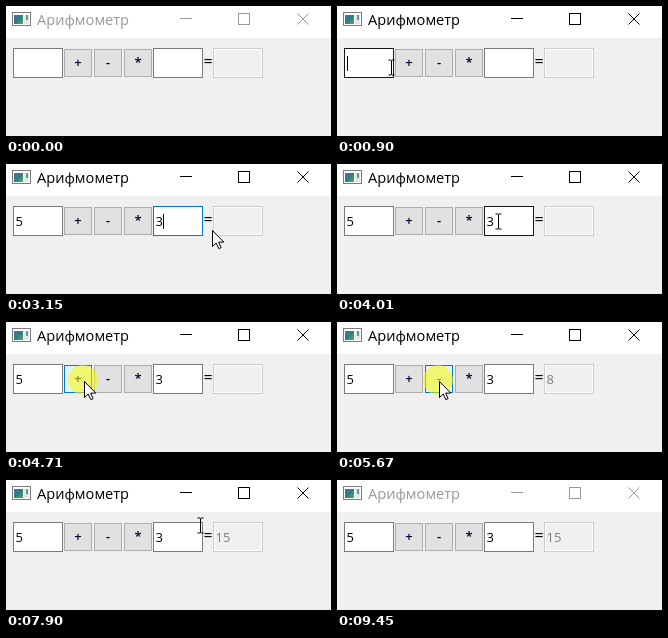
Write an HTML page that moves like this. It is 325 px wide and 130 px high and loops after 9520 ms.

```html
<!DOCTYPE html>
<html lang="ru">
<head>
<meta charset="utf-8">
<title>Арифмометр</title>
<style>
  html, body { margin: 0; width: 100%; height: 100%; overflow: hidden; background: #f0f0f0; }
  svg { display: block; width: 325px; height: 130px; }
  text { font: 13px "Open Sans", "Noto Sans", sans-serif; }
  .title { font-size: 14.6px; }
  .mid { text-anchor: middle; }
  .sign { fill: #000030; font-weight: 600; }
  .box { stroke: #7a7a7a; fill: #fff; }
  .box.focus { stroke: #0078d7; }
  .box.hover { stroke: #171717; }
  .btn { stroke: #adadad; fill: #e1e1e1; }
  .btn.hover { stroke: #0078d7; fill: #e5f1fb; }
</style>
</head>
<body>
<svg viewBox="0 0 325 130">
  <defs>
    <linearGradient id="pane" x2="1" y2="1">
      <stop offset="0" stop-color="#4a6fa0"/>
      <stop offset=".5" stop-color="#2f7f80"/>
      <stop offset="1" stop-color="#58a868"/>
    </linearGradient>
  </defs>
  <rect width="325" height="130" fill="#f0f0f0"/>
  <rect width="325" height="32" fill="#fff"/>
  <g shape-rendering="crispEdges">
    <rect x="6.5" y="6.5" width="18" height="13" fill="#fff" stroke="#7c7c7c"/>
    <rect x="8" y="9" width="9" height="9" fill="url(#pane)"/>
    <rect x="18" y="9" width="5" height="9" fill="#e4e7ea"/>
    <rect x="20" y="9" width="2" height="5" fill="#5f9a96"/>
  </g>
  <text id="title" class="title" x="31" y="19">Арифмометр</text>
  <g id="ctl" fill="none">
    <path d="M174 12.5h12M232.5 7.5h11v11h-11z" shape-rendering="crispEdges"/>
    <path d="M291.5 7.5l11 11m0-11l-11 11"/>
  </g>
  <g id="form"></g>
  <text class="mid" x="202" y="61" style="font-size:16px">=</text>
  <rect x="207.5" y="42.5" width="49" height="29" fill="#f0f0f0" stroke="#ccc"/>
  <rect x="208.5" y="43.5" width="47" height="27" fill="none" stroke="#fff"/>
  <text id="result" x="209.5" y="62" fill="#767d83"></text>
  <rect id="caret" y="50" width="1" height="15"/>
  <circle id="ring" r="15" fill="#fafa00" fill-opacity=".55"/>
  <path id="arrow" d="M1.5 1.5v16l3.7-3.5 2.6 5.6 2.3-1-2.5-5.5h5.2z" fill="#fff" stroke="#000"/>
  <path id="beam" d="M-2.5-7h2.5l.5.5.5-.5h2.5M.5-6.5v14M-2.5 8h2.5l.5-.5.5.5h2.5" fill="none" stroke="#000"/>
</svg>
<script>
const LOOP = 9520, ENTER = 130, LEAVE = 8440;
const HOVER_LAG = 100, RING_TIME = 150, BLINK = 530;
const $ = id => document.getElementById(id);

function add(tag, attrs, text = "") {
  const el = document.createElementNS("http://www.w3.org/2000/svg", tag);
  for (const k in attrs) el.setAttribute(k, attrs[k]);
  el.textContent = text;
  return $("form").appendChild(el);
}
function widget(type, x, y, w, h) {
  const rect = add("rect", { x: x + .5, y: y + .5, width: w - 1, height: h - 1 });
  const hit = p => p[0] >= x && p[0] < x + w && p[1] >= y && p[1] < y + h;
  return { type, x, rect, hit };
}
function box(x) {
  const w = widget("box", x, 42, 50, 30);
  w.label = add("text", { x: x + 2.5, y: 62 });
  return w;
}
function button(x, sign) {
  const w = widget("btn", x, 43, 28, 28);
  add("text", { x: x + 14, y: 61, class: "mid sign" }, sign);
  return w;
}
const boxes = [box(7), box(147)];
const buttons = ["+", "-", "*"].map((sign, i) => button(58 + 30 * i, sign));
const widgets = [...boxes, ...buttons];

// Pointer moves: start time, end time, goal x, y
const moves = [
  [130, 360, 38, 62], [700, 1750, 120, 55], [1750, 2060, 171, 56], [2290, 2600, 203, 65],
  [2900, 3150, 205, 65], [3300, 3460, 226, 57], [3780, 4310, 77, 58], [4880, 5260, 101, 58],
  [5880, 6270, 133, 58], [6900, 6980, 183, 65], [6980, 7130, 261, 66],
  [7280, 7900, 194, 45], [8130, LEAVE, 216, 77]
];
const clicks = [430, 2130, 3610, 4630, 5670, 6670];

// Form changes, each added to the state before it
const changes = [
  [0, { active: false, focus: -1, values: ["", ""], result: "" }],
  [430, { active: true }],
  [500, { focus: 0 }],
  [1370, { values: ["5", ""] }],
  [2200, { focus: 1 }],
  [3150, { values: ["5", "3"] }],
  [4480, { focus: -1 }],
  [4860, { result: "8" }],
  [5810, { result: "2" }],
  [6740, { result: "15" }],
  [9450, { active: false }]
];

function pointer(t) {
  let p = [62, 108];
  for (const [a, b, ...goal] of moves) {
    const k = Math.min(1, Math.max(0, (t - a) / (b - a)));
    p = p.map((v, i) => v + (goal[i] - v) * k);
  }
  return p.map(Math.round);
}

function place(id, shown, x, y) {
  $(id).setAttribute("visibility", shown ? "visible" : "hidden");
  $(id).setAttribute("transform", `translate(${x} ${y})`);
}

function draw(t) {
  const past = changes.filter(c => c[0] <= t);
  const state = Object.assign({}, ...past.map(c => c[1]));
  const idle = t - past.at(-1)[0];
  const p = pointer(t), late = pointer(t - HOVER_LAG);
  const inside = t >= ENTER && t < LEAVE;
  const ink = state.active ? "#000" : "#999";

  $("title").setAttribute("fill", ink);
  $("ctl").setAttribute("stroke", ink);
  $("result").textContent = state.result;
  boxes.forEach((b, i) => b.label.textContent = state.values[i]);

  const focused = boxes[state.focus];
  for (const w of widgets) {
    const hover = inside && w.hit(late) ? " hover" : "";
    w.rect.setAttribute("class", w.type + (w === focused ? " focus" : "") + hover);
  }
  const caretX = focused ? focused.x + 3 + 7 * state.values[state.focus].length : 0;
  place("caret", focused && idle % (2 * BLINK) < BLINK, caretX, 0);

  const overText = boxes.some(b => b.hit(p));
  place("ring", clicks.some(c => t >= c && t < c + RING_TIME), ...p);
  place("arrow", inside && !overText, ...p);
  place("beam", inside && overText, ...p);
}

const start = performance.now();
function tick() {
  draw((performance.now() - start) % LOOP);
  requestAnimationFrame(tick);
}
tick();
</script>
</body>
</html>
```
